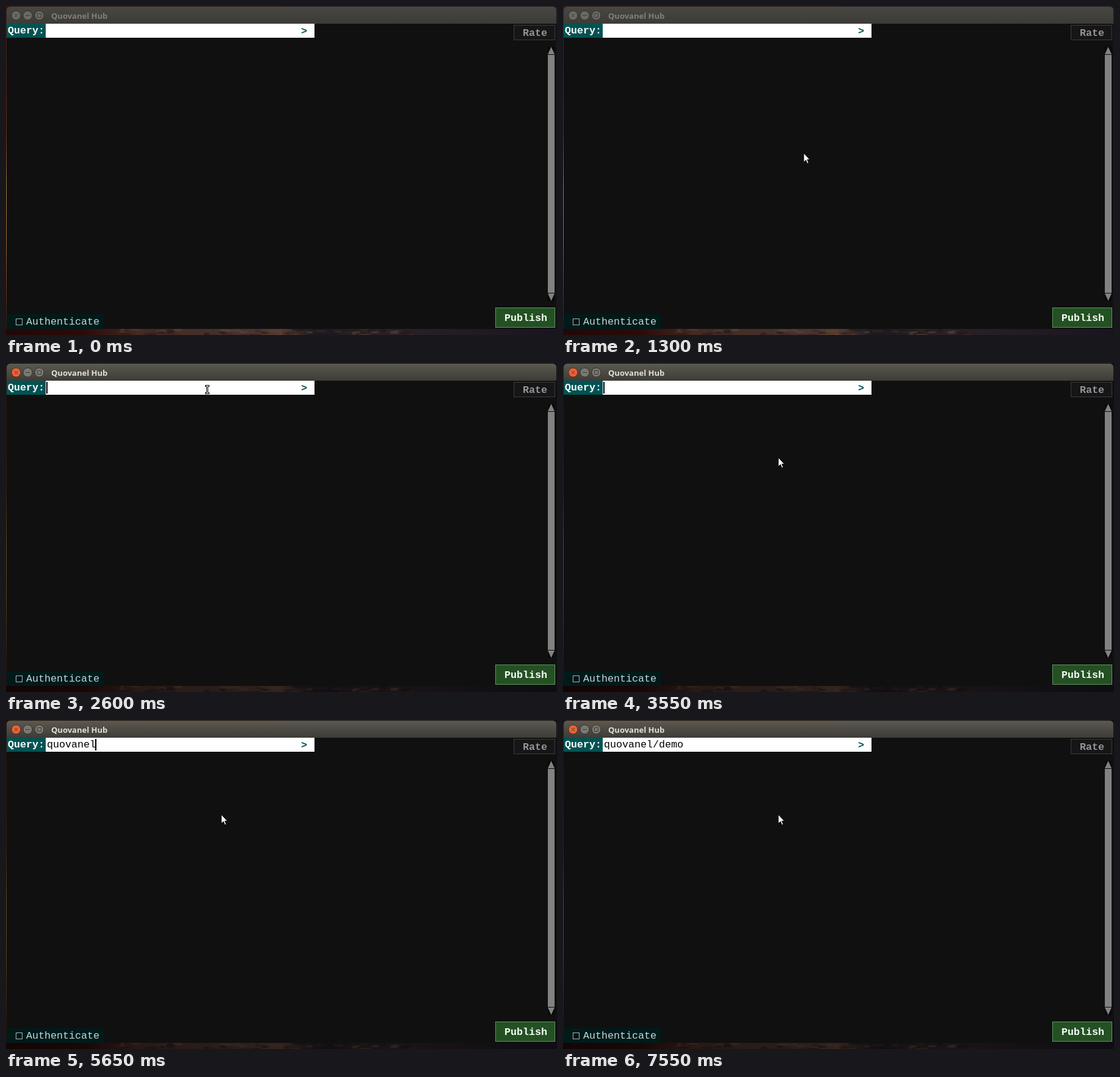
Recreate the animation shown at these times as an HTML page. Size 902 px wide and 539 px high, loop 8 s.

```html
<!DOCTYPE html>
<html lang="en">
<head>
<meta charset="utf-8">
<title>Query window</title>
<style>
  html, body { margin: 0; width: 100%; height: 100%; overflow: hidden; background: #101010; }
  svg { display: block; }
  text { font: 16.667px "Liberation Mono", monospace; }
  .b { font-weight: 700; }
  #title { font: 700 13px "Open Sans", sans-serif; fill: #827f78; }
  .glyph { fill: none; stroke: #3c3b37; }
  .knob { fill: #6b6963; stroke: #34332f; }
  .focus #title { fill: #e2ded6; }
  .focus .knob { fill: #7b7871; }
  .focus #close { fill: #ea6237; stroke: #5a2a18; }
  .focus #bar { fill: url(#barOn); }
  #shade { opacity: 0; }
  .focus #shade { opacity: .4; }
  rect { shape-rendering: crispEdges; }
</style>
</head>
<body>
<svg id="stage" width="902" height="539" viewBox="0 0 902 539">
  <defs>
    <linearGradient id="barOff" x2="0" y2="1">
      <stop stop-color="#484742"/><stop offset="1" stop-color="#3c3b37"/>
    </linearGradient>
    <linearGradient id="barOn" x2="0" y2="1">
      <stop stop-color="#5b594f"/><stop offset="1" stop-color="#3d3c37"/>
    </linearGradient>
    <linearGradient id="ground">
      <stop stop-color="#220808"/><stop offset=".14" stop-color="#2a0b09"/>
      <stop offset=".24" stop-color="#432a22"/><stop offset=".42" stop-color="#46322d"/>
      <stop offset=".5" stop-color="#543a2d"/><stop offset=".56" stop-color="#1d1a22"/>
      <stop offset=".7" stop-color="#2a2126"/><stop offset="1" stop-color="#18151f"/>
    </linearGradient>
    <linearGradient id="edge" x2="0" y2="1">
      <stop stop-color="#3a1c12"/><stop offset=".4" stop-color="#6a3018"/>
      <stop offset=".57" stop-color="#a08040"/><stop offset=".72" stop-color="#a86a34"/>
      <stop offset="1" stop-color="#3a120c"/>
    </linearGradient>
  </defs>

  <!-- desktop behind the window -->
  <rect width="902" height="539" fill="#1b1620"/>
  <rect width="450" height="2" fill="#33170e"/>
  <rect y="528" width="902" height="11" fill="url(#ground)"/>
  <g id="flecks"></g>
  <rect width="1" height="529" fill="url(#edge)"/>
  <rect id="shade" width="902" height="539"/>

  <!-- window -->
  <path id="bar" d="M1 29V7Q1 1 7 1H895Q901 1 901 7V29Z" fill="url(#barOff)"/>
  <circle id="close" class="knob" cx="16.5" cy="15.5" r="7.5"/>
  <circle class="knob" cx="35.5" cy="15.5" r="7.5"/>
  <circle class="knob" cx="54.5" cy="15.5" r="7.5"/>
  <path class="glyph" d="M14 13l5 5m0-5l-5 5M32 15.5h7M51.5 12.5h6v6h-6z"/>
  <text id="title" x="74" y="20.5">Quovanel Hub</text>
  <rect x="1" y="29" width="900" height="500" fill="#101010"/>

  <rect x="1" y="29" width="64" height="23" fill="#005353"/>
  <text class="b" x="3" y="45" fill="#fff">Query:</text>
  <rect x="65" y="29" width="440" height="23" fill="#fff"/>
  <text id="entry" x="67" y="45"></text>
  <rect id="caret" x="66" y="31" width="2" height="19"/>
  <text class="b" x="483" y="46" fill="#005353">&gt;</text>

  <rect x="831.5" y="31.5" width="67" height="24" fill="#161616" stroke="#3c3c40"/>
  <text class="b" x="846" y="49" fill="#98949c">Rate</text>

  <rect x="887" y="67" width="11" height="416" fill="#0a0a0a"/>
  <rect x="887" y="80" width="11" height="390" fill="#828282"/>
  <path d="M892.5 67L898 79H887ZM887 471H898L892.5 483Z" fill="#828282"/>

  <rect x="801.5" y="494.5" width="97" height="32" fill="#245024" stroke="#5c985c"/>
  <text class="b" x="816" y="516" fill="#f4fff4">Publish</text>

  <rect x="1" y="505" width="159" height="24" fill="#001a1a"/>
  <rect x="16.5" y="512.5" width="10" height="10" fill="#001414" stroke="#a9b8b8"/>
  <text x="33" y="522" fill="#c3d8dc">Authenticate</text>

  <!-- pointers -->
  <path id="arrow" d="M.5 0V14.5L4 11.3L6.3 16.7L8.5 15.8L6.2 10.4H10.4Z"
        fill="#fff" stroke="#000" stroke-width=".8"/>
  <g id="beam" fill="none">
    <path d="M-3.5-6H3.5M0-6V6M-3.5 6H3.5" stroke="#000" stroke-width="3"/>
    <path d="M-2.5-6H2.5M0-6V6M-2.5 6H2.5" stroke="#fff"/>
  </g>
</svg>
<script>
const $ = id => document.getElementById(id);
const query = "quovanel/demo";
const LOOP = 8000;

// [start ms, letters typed, caret shown]
const typing = [
  [0, 0, 0], [2600, 0, 1], [3250, 0, 0], [3550, 0, 1], [3850, 1, 1], [4150, 2, 0],
  [4500, 4, 1], [4800, 6, 0], [5100, 7, 1], [5650, 8, 1], [5950, 9, 0], [6300, 11, 1],
  [6600, 12, 0], [6900, 12, 1], [7250, 13, 1], [7550, 13, 0]
];

// Seeded patches of ground along the lower edge
let seed = 11;
const rnd = () => (seed = seed * 16807 % 2147483647) / 2147483647;
const tones = ["#5d4337", "#211519", "#362828"];
let patches = "";
for (let i = 0; i < 60; i++) {
  const x = 190 + rnd() * 470;
  patches += `<ellipse cx="${x}" cy="${530 + rnd() * 9}" rx="${3 + rnd() * 9}" ry="${1 + rnd() * 2}"
    fill="${tones[i % 3]}" opacity=".6"/>`;
}
$("flecks").innerHTML = patches;

const mix = (a, b, k) => a.map((v, i) => v + (b[i] - v) * k);

// Sweep in 50 ms steps: speeds up to the bend, then settles
function sweep(t) {
  const step = Math.min(10, Math.floor((t - 850) / 50));
  const bend = [553, 447];
  return step < 4
    ? mix([689, 531], bend, (step / 4) ** 1.3)
    : mix(bend, [388, 234], Math.sin((step - 4) / 6 * Math.PI / 2));
}

function arrowAt(t) {
  if (t < 850 || t >= 2300 && t < 2900) return null;
  if (t < 2300) return sweep(t);
  return t < 3250 ? [347, 144] : [352, 155];
}

function beamAt(t) {
  if (t < 2300 || t >= 2900) return null;
  return [329.5, t < 2600 ? 45.5 : 43.5];
}

function place(el, pos) {
  el.setAttribute("visibility", pos ? "visible" : "hidden");
  if (pos) el.setAttribute("transform", `translate(${pos})`);
}

function draw(now) {
  const t = now % LOOP;
  const [, count, caret] = typing.findLast(s => s[0] <= t);
  $("stage").classList.toggle("focus", t >= 2600);
  $("entry").textContent = query.slice(0, count);
  place($("caret"), caret ? [count * 10, 0] : null);
  place($("arrow"), arrowAt(t));
  place($("beam"), beamAt(t));
}

function tick() {
  draw(performance.now());
  requestAnimationFrame(tick);
}
tick();
</script>
</body>
</html>
```
